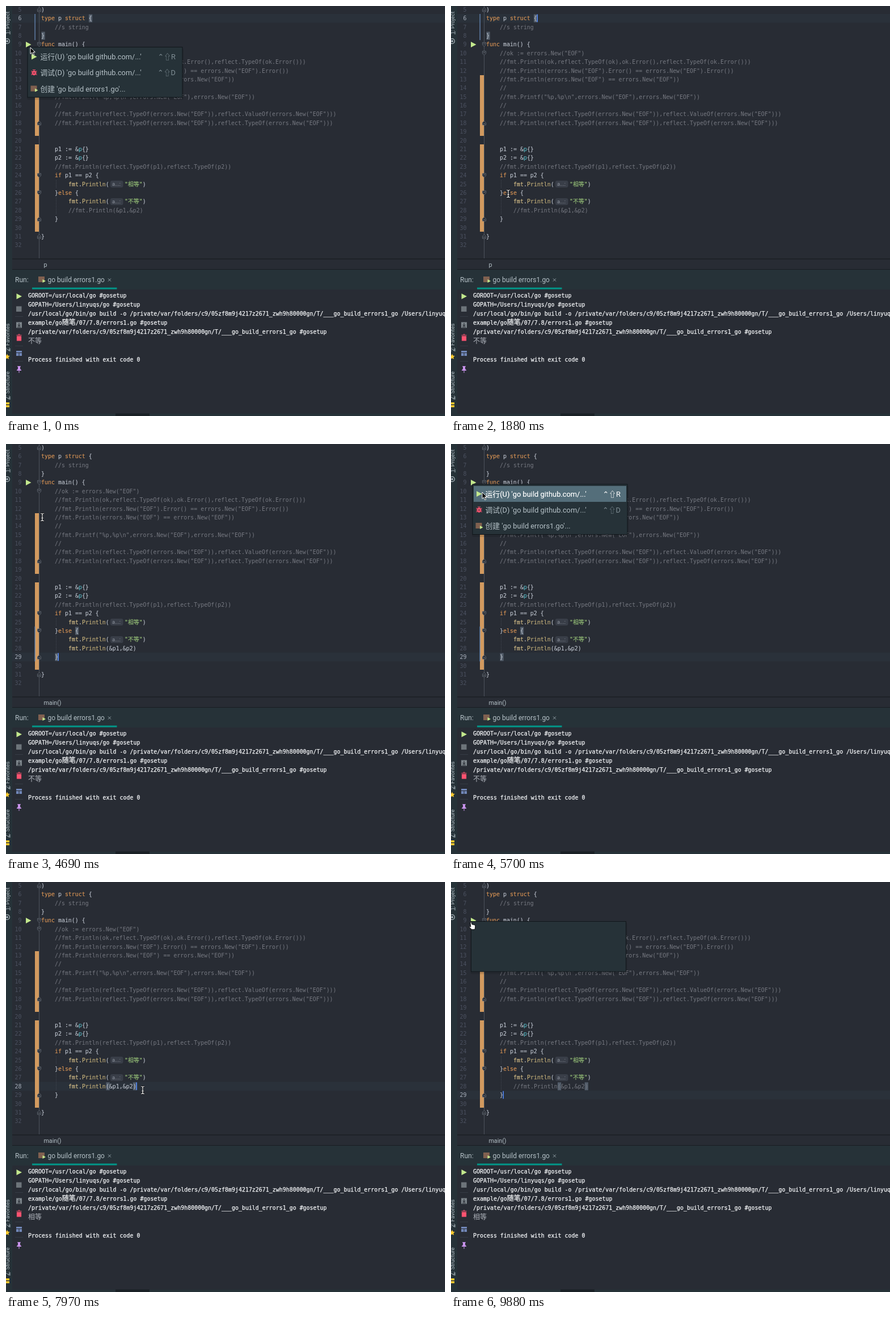
An HTML page that plays this animation: 774x723 px, repeating every 9980 ms.

```html
<!DOCTYPE html>
<html lang="zh">
<head>
<meta charset="utf-8">
<title>Go editor session</title>
<style>
  html, body { margin: 0; width: 100%; height: 100%; overflow: hidden; background: #282c34; }
  svg { display: block; width: 774px; height: 723px; }
  text { white-space: pre; }
  .code { font: 9.95px "DejaVu Sans Mono", "Noto Sans CJK SC", monospace; fill: #bcc2cc; stroke: #bcc2cc; stroke-width: .12px; }
  .code .kw { fill: #dc9656; stroke: #dc9656; }
  .code .str { fill: #98c379; stroke: #98c379; }
  .code .pkg { fill: #dcc48c; stroke: #dcc48c; }
  .code .fn { fill: #c9b47c; stroke: #c9b47c; }
  .code .typ { fill: #56b6c2; stroke: #56b6c2; }
  .code.note { fill: #757880; stroke: none; }
  .num { font: 9.95px "DejaVu Sans Mono", monospace; fill: #4b5160; text-anchor: end; }
  .num.lit { fill: #a9b0bc; }
  .out { font: 9.95px "DejaVu Sans Mono", "Noto Sans CJK SC", monospace; fill: #f4f6f8; stroke: #f4f6f8; stroke-width: .25px; }
  .out.plain { fill: #aeb3bb; stroke: none; }
  .cjk { font-size: 12px; }
  .ui { font: 12px Roboto, "Noto Sans CJK SC", "DejaVu Sans", sans-serif; fill: #b4c0c6; }
  .side { font-size: 9.6px; }
  .menu { font-size: 12.85px; }
</style>
</head>
<body>
<svg id="stage" viewBox="0 0 774 723"></svg>
<script>
const LOOP = 9980;
const lineY = n => 6.3 + 15.39 * (n - 5);

const rect = (x, y, w, h, fill, extra = "") =>
  `<rect x="${x}" y="${y}" width="${w}" height="${h}" fill="${fill}" ${extra}/>`;
const path = (d, extra) => `<path d="${d}" ${extra}/>`;
const label = (x, y, s, cls, extra = "") =>
  `<text x="${x}" y="${y}" class="${cls}" ${extra}>${s}</text>`;
// Visible only inside the given "from-to" spans, in ms
const on = (spans, body) => `<g data-on="${spans}">${body}</g>`;
const play = (x, y, r = 5) =>
  path(`M${x - r + .5} ${y - r}L${x + r} ${y}L${x - r + .5} ${y + r}Z`, 'fill="#c3e88d"');

function tokens(s) {
  const rule = /("[^"]*")|\b(type|struct|func|if|else)\b|\b(fmt)\b|\b(Println)\b|(?<=&amp;)(p)(?=\{)/g;
  const kinds = ["str", "kw", "pkg", "fn", "typ"];
  return s.replace(/&/g, "&amp;").replace(rule, (m, ...g) =>
    `<tspan class="${kinds[g.findIndex((v, i) => i < 5 && v)]}">${m}</tspan>`);
}

function code(n, indent, s) {
  const x = 62 + indent * 24, y = lineY(n) + 3.5;
  if (s.startsWith("//")) return label(x, y, s.replace(/&/g, "&amp;"), "code note");
  const [head, tail] = s.split("@");
  const rest = tail ? `<tspan x="209">${tokens(tail)}</tspan>` : "";
  const hint = tail
    ? rect(184, lineY(n) - 6, 22.5, 12, "#393e48", 'rx="3"') +
      label(187, lineY(n) + 3, "a...:", "ui", 'style="font-size:9.5px;fill:#8e949e"')
    : "";
  return hint + label(x, y, tokens(head) + rest, "code");
}

const source = [
  [5, 0, ")"], [6, 0, "type p struct {"], [7, 1, "//s string"], [8, 0, "}"],
  [9, 0, "func main() {"],
  [10, 1, '//ok := errors.New("EOF")'],
  [11, 1, "//fmt.Println(ok,reflect.TypeOf(ok),ok.Error(),reflect.TypeOf(ok.Error()))"],
  [12, 1, '//fmt.Println(errors.New("EOF").Error() == errors.New("EOF").Error())'],
  [13, 1, '//fmt.Println(errors.New("EOF") == errors.New("EOF"))'],
  [14, 1, "//"],
  [15, 1, '//fmt.Printf("%p,%p\\n",errors.New("EOF"),errors.New("EOF"))'],
  [16, 1, "//"],
  [17, 1, '//fmt.Println(reflect.TypeOf(errors.New("EOF")),reflect.ValueOf(errors.New("EOF")))'],
  [18, 1, '//fmt.Println(reflect.TypeOf(errors.New("EOF")),reflect.TypeOf(errors.New("EOF")))'],
  [21, 1, "p1 := &p{}"], [22, 1, "p2 := &p{}"],
  [23, 1, "//fmt.Println(reflect.TypeOf(p1),reflect.TypeOf(p2))"],
  [24, 1, "if p1 == p2 {"], [25, 2, 'fmt.Println(@"相等")'],
  [26, 1, "}else {"], [27, 2, 'fmt.Println(@"不等")'],
  [29, 1, "}"], [31, 0, "}"]
];

const activeLine = (n, spans) => on(spans,
  rect(11, lineY(n) - 7.7, 763, 15.4, "#2a313a") + label(27.5, lineY(n) + 3.5, n, "num lit"));
const brace = (x, n) => rect(x, lineY(n) - 7, 6.2, 14, "#525c69");
const caret = (x, n, spans) => on(spans, rect(x, lineY(n) - 7, 1.5, 13.6, "#528bff"));
const scope = (a, b) => rect(50.5, lineY(a) - 7.7, 1.2, (b - a + 1) * 15.39, "#6b8fc0");

function fold(n, closing) {
  const y = lineY(n), k = closing ? -1 : 1;
  return path(`M55.5 ${y - 3.5 * k}h6v${4 * k}l-3 ${3 * k}l-3 ${-3 * k}z`,
    'fill="#282c34" stroke="#646b75" stroke-width=".9"') +
    path(`M57 ${y - k}h3`, 'stroke="#7b828c" stroke-width=".9"');
}

function editor() {
  let s = activeLine(6, "0-2880") + activeLine(28, "2880-3800 7790-8740") +
    activeLine(29, "3800-7790 8740-9980");
  s += rect(51, 122, 7, 107, "#d29a5f") + rect(51, 244, 7, 154, "#d29a5f");
  s += rect(58, 0, 1, 445, "#4d535c");
  for (const n of [9, 10, 24, 26]) s += fold(n, false);
  for (const n of [5, 18, 29, 31]) s += fold(n, true);
  for (let n = 5; n <= 32; n++) {
    const hot = { 6: "2880-9980", 28: "0-2880 3800-7790 8740-9980", 29: "0-3800 7790-8740" }[n];
    const t = label(27.5, lineY(n) + 3.5, n, "num");
    s += hot ? on(hot, t) : t;
  }
  s += path("M88.5 307v15M88.5 338v30", 'stroke="#454b55" stroke-dasharray="1 1.5"');
  s += on("0-2880", brace(146, 6) + brace(62.5, 8) + scope(6, 8));
  s += on("3800-7790", brace(122, 26) + brace(86.5, 29) + scope(26, 29));
  s += on("7790-8740", brace(176.5, 28) + brace(224, 28));
  s += on("8740-9980", brace(188, 28) + brace(235.7, 28));
  s += source.map(l => code(...l)).join("");
  s += on("0-3800 8740-9980", code(28, 2, "//fmt.Println(&p1,&p2)"));
  s += on("3800-8740", code(28, 2, "fmt.Println(&p1,&p2)"));
  s += caret(151.5, 6, "580-1080 1580-2080") + caret(241, 28, "2880-3570") +
    caret(91.5, 29, "3800-4370 4580-5110 5880-6900 7400-7790 8740-9980") +
    caret(229.5, 28, "7790-8740");
  return s + play(39.5, 68);
}

const runIcon = (x, y) => rect(x - 6, y - 5, 11, 10, "#80604f") + play(x + 4, y + 3, 3);

function sidebar() {
  const up = (y, t) => label(0, 0, t, "ui side", `transform="translate(5.5 ${y}) rotate(-90)"`);
  return rect(0, 0, 11, 723, "#263238") +
    up(50, '<tspan text-decoration="underline">1</tspan>: Project') +
    '<circle cx="2" cy="62" r="4.3" fill="none" stroke="#b4c0c6" stroke-width="1.2"/><circle cx="2" cy="62" r="1.8" fill="#b4c0c6"/>' +
    up(609, '<tspan text-decoration="underline">2</tspan>: Favorites') +
    path("M2 613.5l1.4 3.1 3.4.4-2.5 2.3.7 3.4-3-1.7-3 1.7.7-3.4-2.5-2.3 3.4-.4z", 'fill="#ffcb2e"') +
    up(694, '<tspan text-decoration="underline">Z</tspan>: Structure') +
    rect(0, 699, 6, 3.5, "#ffcb2e") + rect(0, 704, 6, 3.5, "#ffcb2e");
}

function toolbar() {
  const line = y => rect(16, y, 14, 1, "#363c45");
  return on("0-6060 6540-9980", play(23, 512)) +
    on("6060-6540", path("M26.5 510a4 4 0 1 0 .3 3.5M27 507v3.5h-3.5", 'fill="none" stroke="#c3e88d" stroke-width="1.5"')) +
    rect(18, 529.5, 9.5, 9.5, "#6d747a") + line(547) +
    rect(18, 557.5, 10, 10, "#7d858b") +
    path("M23 559v5M20.7 562l2.3 2.5 2.3-2.5M20 566h6", 'fill="none" stroke="#282c34" stroke-width="1.1"') +
    path("M18.5 580.5h9M21.5 579h3M19.5 582.5h7v7.5h-7z", 'fill="#ff5370" stroke="#ff5370" stroke-width="1.2"') +
    line(599) + rect(18, 608, 10, 3, "#7187b8") + rect(18, 612, 4.5, 5, "#7187b8") + rect(23.5, 612, 4.5, 5, "#7187b8") +
    line(626) + path("M20 635h6v1h-1v4l2 2v1h-8v-1l2-2v-4h-1z", 'fill="#c792ea"') + rect(22.5, 642, 1, 5, "#c792ea");
}

function runPanel() {
  const row = (i, t, cls = "out") => label(39, 513.6 + 16.2 * i, t, cls);
  const cjk = t => `<tspan class="cjk">${t}</tspan>`;
  const bin = "/private/var/folders/c9/05zf8m9j4217z2671_zwh9h80000gn/T/___go_build_errors1_go";
  return rect(11, 445.5, 763, 1, "#15181c") +
    on("0-3240", label(66.5, 459.5, "p", "ui", 'style="font-size:10.7px"')) +
    on("3240-9980", label(66.5, 459.5, "main()", "ui", 'style="font-size:10.7px"')) +
    rect(11, 464, 763, 36, "#263238") + rect(11, 464, 763, 1, "#191d21") +
    rect(46, 496.5, 149.5, 3, "#009688") +
    label(16, 486.7, "Run:", "ui") + runIcon(63, 482) +
    label(73.5, 486.7, "go build errors1.go", "ui") +
    path("M180 480.5l5 5m0-5l-5 5", 'stroke="#92a0a7"') +
    toolbar() +
    row(0, "GOROOT=/usr/local/go #gosetup") +
    row(1, "GOPATH=/Users/linyuqs/go #gosetup") +
    row(2, `/usr/local/go/bin/go build -o ${bin} /Users/linyuqs/go/src/`) +
    row(3, `example/go${cjk("随笔")}/07/7.8/errors1.go #gosetup`) +
    on("0-6480 6540-9980", row(4, `${bin} #gosetup`) + row(7, "Process finished with exit code 0")) +
    on("0-6480", row(5, cjk("不等"), "out plain")) +
    on("6540-9980", row(5, cjk("相等"), "out plain")) +
    rect(0, 719, 774, 4, "#263238") + rect(193, 718.5, 60, 4.5, "#1a2126");
}

const panel = (x, y) =>
  rect(x - 1, y + 2, 276, 91, "#000", 'opacity=".12" rx="3"') +
  rect(x, y, 273, 88.5, "#263238", 'stroke="#11161a"');

function menu(y, hotSpans) {
  const rows = y => {
    const bug = y + 45;
    return play(49.5, y + 17, 5) +
      `<ellipse cx="49.5" cy="${bug + .5}" rx="3.3" ry="4.2" fill="#ff5370"/>` +
      path(`M44.5 ${bug - 3}l10 7m0-7l-10 7M44.5 ${bug + .5}h10M47 ${bug - 5}l5 0`, 'stroke="#ff5370" stroke-width="1.1"') +
      path(`M48 ${bug - .5}h3m-3 2h3`, 'stroke="#263238" stroke-width=".8"') +
      runIcon(49.5, y + 73);
  };
  const item = (dy, t, key, tint = "") => label(60.5, y + dy + 4.6, t, "ui menu", tint && `style="fill:${tint}"`) +
    label(299, y + dy + 4.6, key, "ui menu", `text-anchor="end" style="fill:${tint || "#7f8d94"}"`);
  const run = tint => item(17, "运行(U) 'go build github.com/...'", "⌃⇧R", tint);
  return panel(38, y) +
    on(hotSpans, rect(40, y + 3, 269, 28, "#546e7a")) + run("") + on(hotSpans, run("#fff")) +
    item(45.2, "调试(D) 'go build github.com/...'", "⌃⇧D") +
    item(73.5, "创建 'go build errors1.go'...", "") + rows(y);
}

const pointers = {
  arrow: path("M0 0v11.5l2.7-2.5 2 4.6 2-.9-2-4.4h3.6z", 'fill="#000" stroke="#fff" stroke-width="1"'),
  beam: ["#000", "#fff"].map((c, i) =>
    path("M-2.8-6.5q2.8 0 2.8 1.8v9.4q0 1.8-2.8 1.8M2.8-6.5q-2.8 0-2.8 1.8v9.4q0 1.8 2.8 1.8M-1.5 1.5h3",
      `fill="none" stroke="${c}" stroke-width="${i ? 1.2 : 2.4}"`)).join(""),
  hand: path("M-1 0q1.5-1 2 .6l1 3.2 3.8.6q2 .4 2 2.4l-.2 3.4-1 2.6h-5l-4.2-4q-.6-1.5 1.2-1.2l1.2.6z",
    'fill="#fff" stroke="#000" stroke-width=".9"')
};

// time, x, y, pointer
const track = [
  [0, 43, 73, "arrow"], [50, 43, 73, "arrow"], [230, 50, 87, "arrow"],
  [940, 50, 87, "arrow"], [1400, 23, 632, "arrow"], [1580, 40, 590, "beam"], [1880, 101, 331, "beam"],
  [1940, 101, 333, "beam"], [2280, 140, 383, "beam"], [2460, 140, 383, "beam"], [2880, 246, 367, "beam"],
  [3060, 247, 367, "beam"], [4100, 247, 367, "beam"], [4400, 82, 198, "beam"], [4580, 72, 148, "beam"],
  [4690, 64, 129, "beam"], [4750, 58, 112, "arrow"], [5110, 42, 74, "arrow"],
  [5460, 42, 74, "arrow"], [5700, 55, 85, "arrow"], [7380, 55, 85, "arrow"], [7400, 70, 110, "beam"],
  [7550, 220, 374, "beam"], [7730, 225, 372, "beam"], [7970, 241, 367, "beam"],
  [9040, 241, 367, "beam"], [9220, 93, 175, "beam"], [9400, 93, 175, "beam"],
  [9640, 45, 84, "arrow"], [9760, 35, 71, "hand"], [LOOP, 35, 71, "hand"]
];

const stage = document.getElementById("stage");
stage.innerHTML = rect(0, 0, 774, 723, "#282c34") + editor() + runPanel() + sidebar() +
  on("0-400", menu(72.5, "140-400")) + on("5280-5880", menu(71, "5460-5880")) +
  on("9880-9980", panel(35.5, 69.5)) +
  `<g id="pointer">${Object.entries(pointers).map(([k, v]) => `<g data-kind="${k}">${v}</g>`).join("")}</g>`;

const pointer = document.getElementById("pointer");
const timed = [...stage.querySelectorAll("[data-on]")].map(el =>
  [el, el.dataset.on.split(" ").map(s => s.split("-").map(Number))]);

function draw(t) {
  for (const [el, spans] of timed)
    el.style.display = spans.some(([a, b]) => t >= a && t < b) ? "" : "none";
  const i = track.findIndex(k => k[0] > t);
  const [a, b] = [track[i - 1], track[i]];
  const p = Math.floor((t - a[0]) / 60) * 60 / (b[0] - a[0]);
  const mix = j => a[j] + (b[j] - a[j]) * p;
  pointer.setAttribute("transform", `translate(${mix(1)} ${mix(2)})`);
  for (const el of pointer.children) el.style.display = el.dataset.kind === a[3] ? "" : "none";
}

const start = performance.now();
function tick() {
  draw((performance.now() - start) % LOOP);
  requestAnimationFrame(tick);
}
tick();
</script>
</body>
</html>
```
